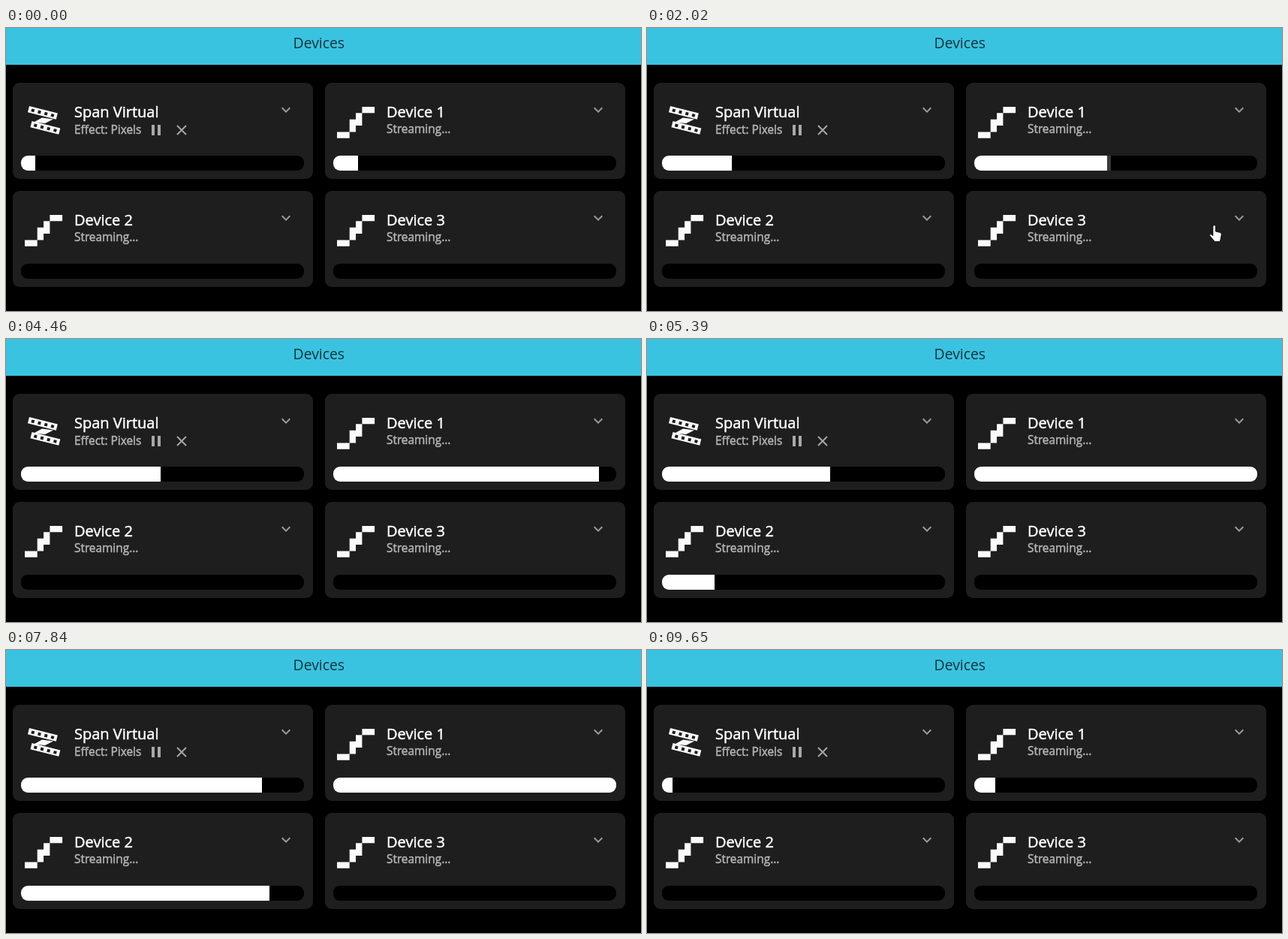
An HTML page that plays this animation: 846x377 px, repeating every 9720 ms.

```html
<!DOCTYPE html>
<html lang="en">
<head>
<meta charset="utf-8">
<title>Devices</title>
<style>
  html, body { margin: 0; width: 100%; height: 100%; overflow: hidden; background: #000; }
  svg { display: block; width: 846px; height: 377px; }
  text { font-family: "Open Sans", "Noto Sans", sans-serif; font-weight: 400; }
  .name { font-size: 20px; fill: #fff; stroke: #fff; stroke-width: .5px; }
  .state { font-size: 15.4px; fill: #b4b4b4; stroke: #b4b4b4; stroke-width: .5px; }
  .cross { fill: none; stroke: #a5a5a5; stroke-width: 2; }
  .bar { shape-rendering: crispEdges; }
</style>
</head>
<body>
<svg viewBox="0 0 846 377">
  <defs>
    <clipPath id="track"><rect x="11" y="97" width="377" height="20" rx="9"/></clipPath>
    <path id="stairs" fill="#fafafa" transform="translate(16 32) scale(8.35)"
      d="M4 0h2v1h-2v2h-1v1h-1v1h-2v-1h2v-2h1v-1h1z"/>
    <g id="strip">
      <rect width="39" height="8.5" fill="#fafafa"/>
      <path d="M4 2.5h4v4h-4zM13 2.5h4v4h-4zM22 2.5h4v4h-4zM31 2.5h4v4h-4z" fill="#1e1e1e"/>
    </g>
    <g id="span">
      <use href="#strip" transform="translate(22 31) rotate(14)"/>
      <use href="#strip" transform="translate(25.5 51) rotate(14)"/>
      <path d="M28 52.5l11-6 15 2-11 5.5z" fill="#fafafa"/>
    </g>
  </defs>
  <rect width="846" height="49" fill="#3ac3e0"/>
  <text x="382.5" y="27" font-size="19.4" fill="#17343d">Devices</text>
  <g id="cards"></g>
  <path id="cursor" fill="#fff" stroke="#000" stroke-width=".8"
    d="M5 12V2.5a1.8 1.8 0 0 1 3.6 0V9l6 1.5q2 .6 1.7 2.6l-1 6q-.5 3-2 3.5H7.5L1 15q-1-1.5.3-2.2q1.2-.6 3.7 2z"/>
</svg>
<script>
const LOOP = 9720, TICK = LOOP / 145, COLUMNS = 81, TRACK = 377;

// start and end: the part of the whole strip, in columns, that each bar shows
const cards = [
  { name: 'Span Virtual', icon: 'span', x: 9, y: 73, start: 0, end: 81 },
  { name: 'Device 1', icon: 'stairs', x: 425, y: 73, start: 0, end: 43.2 },
  { name: 'Device 2', icon: 'stairs', x: 9, y: 217, start: 43.2, end: 72.7 },
  { name: 'Device 3', icon: 'stairs', x: 425, y: 217, start: 72.6, end: 81 },
];

const effectState = `<text class="state" x="82" y="68">Effect: Pixels</text>
  <path fill="#a8a8a8" d="M185 56h4v14h-4zM193 56h4v14h-4z"/>
  <path class="cross" d="M219 57l12 12m0-12l-12 12"/>`;
const streamState = '<text class="state" x="82" y="67">Streaming...</text>';

document.getElementById('cards').innerHTML = cards.map(({ name, icon, x, y }, i) => `
  <g transform="translate(${x} ${y})">
    <rect width="400" height="128" rx="9" fill="#1e1e1e"/>
    <use href="#${icon}"/>
    <text class="name" x="82" y="46.3">${name}</text>
    ${i ? streamState : effectState}
    <path fill="#9a9a9a" d="M368.6 32.6l-4.6 4.6-4.6-4.6-1.4 1.4 6 6 6-6z"/>
    <rect x="11" y="97" width="377" height="20" rx="9"/>
    <g class="bar" clip-path="url(#track)">
      <rect class="edge" y="97" height="20"/>
      <rect class="fill" x="11" y="97" height="20" fill="#fff"/>
    </g>
  </g>`).join('');

const fills = document.querySelectorAll('.fill');
const edges = document.querySelectorAll('.edge');
const cursor = document.getElementById('cursor');

const columnX = n => Math.max(0, Math.ceil(n * TRACK / COLUMNS - 0.28));

function drawBars(t) {
  const time = Math.floor(t / TICK + 0.1) * TICK;
  const lit = (4.03 + time / LOOP * COLUMNS) % COLUMNS;
  cards.forEach(({ start, end }, i) => {
    const part = Math.min(1, Math.max(0, (lit - start) / (end - start)));
    const n = Math.floor(part * COLUMNS);
    const width = columnX(n);
    fills[i].setAttribute('width', width);
    // device bars show a faint leading column around the middle
    const glow = i ? 58 * Math.exp(-(((n - 39) / 7) ** 2)) : 0;
    edges[i].setAttribute('x', 11 + width);
    edges[i].setAttribute('width', columnX(n + 1) - width);
    edges[i].setAttribute('fill', `rgb(${glow},${glow},${glow})`);
  });
}

// The hand shows briefly, then speeds off to the lower right
function drawCursor(t) {
  const step = Math.floor((t - 2020) / 70);
  cursor.setAttribute('visibility', step >= 0 && step < 4 ? 'visible' : 'hidden');
  cursor.setAttribute('transform', `translate(${749 + 9 * step ** 2} ${262 + 46 * step})`);
}

const begin = performance.now();
function frame() {
  const t = (performance.now() - begin) % LOOP;
  drawBars(t);
  drawCursor(t);
  requestAnimationFrame(frame);
}
frame();
</script>
</body>
</html>
```
